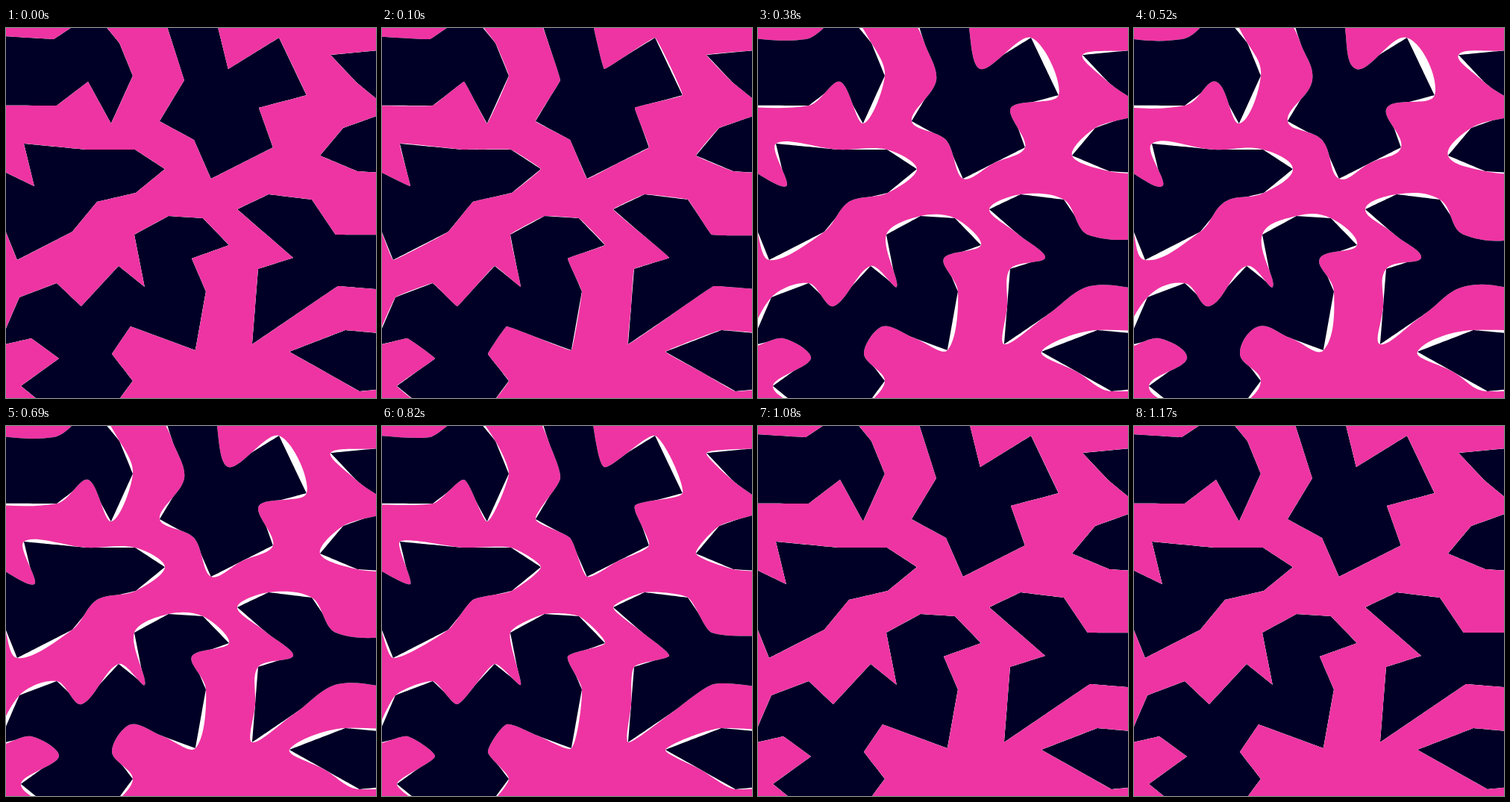
Write an HTML page with a canvas that moves like this. It is 496 by 496 pixels and loops after 1190 ms.

```html
<!DOCTYPE html>
<html lang="en">
<head>
<meta charset="utf-8">
<title>Tension</title>
<style>
  html, body { margin: 0; height: 100%; overflow: hidden; background: #ee34a2; }
  canvas { display: block; }
</style>
</head>
<body>
<canvas width="496" height="496"></canvas>
<script>
const PERIOD = 1190, PEAK = 540, MAX_TENSION = 0.4, LONGEST_EDGE = 92;
const PINK = '#ee34a2', WHITE = '#fff', NAVY = '#000026';
const ctx = document.querySelector('canvas').getContext('2d');

const distance = (a, b) => Math.hypot(b[0] - a[0], b[1] - a[1]);
const midpoint = (a, b) => [(a[0] + b[0]) / 2, (a[1] + b[1]) / 2];

// Key corners of each blob; long edges get a point in the middle.
const blobs = [
  '64,15 118,-21 152,20 170,64 141,128 110,72 68,104 -200,103 -200,-1',
  '205,-36 239,70 206,125 252,150 275,202 358,160 339,107 403,90 366,13 298,55 262,-90',
  '435,36 560,24 600,200 471,192 421,171 452,134 516,111 470,73',
  '24,155 108,163 173,163 213,189 174,221 122,233 89,273 15,311 -6,259 -80,155 38,212',
  '18,361 68,342 101,373 151,319 186,347 172,277 218,252 264,255 299,291 249,309 268,353 254,432 167,400 142,437 170,473 111,553 20,480 71,443 34,416 -10,426',
  '310,243 352,223 410,230 442,277 530,277 600,220 620,360 445,346 330,424 338,323 385,308',
  '380,434 455,405 900,445 474,487'
].map(text => {
  const corners = text.split(' ').map(pair => pair.split(',').map(Number));
  return corners.flatMap((corner, i) => {
    const next = corners[(i + 1) % corners.length];
    return distance(corner, next) > LONGEST_EDGE ? [corner, midpoint(corner, next)] : [corner];
  });
});

// Spline whose handles scale with the adjoining edge; zero tension is straight.
function outline(tension) {
  const path = new Path2D();
  for (const points of blobs) {
    const at = i => points[(i + points.length) % points.length];
    const handle = (i, side) => {
      const here = at(i), to = at(i + side), from = at(i - side);
      const length = distance(here, to);
      const k = tension * length / (length + distance(here, from));
      return here.map((v, axis) => v + k * (to[axis] - from[axis]));
    };
    path.moveTo(...at(0));
    points.forEach((_, i) =>
      path.bezierCurveTo(...handle(i, 1), ...handle(i + 1, -1), ...at(i + 1)));
    path.closePath();
  }
  return path;
}

const polygons = outline(0);

function draw(time) {
  const phase = 2 * Math.PI * (time - PEAK) / PERIOD;
  const curves = outline(MAX_TENSION * (1 + Math.cos(phase)) / 2);
  ctx.fillStyle = PINK;
  ctx.fillRect(0, 0, 496, 496);
  ctx.fillStyle = WHITE;
  ctx.fill(curves);
  ctx.save();
  ctx.clip(curves);
  ctx.fillStyle = NAVY;
  ctx.fill(polygons);
  ctx.restore();
}

const start = performance.now();
function tick() {
  draw((performance.now() - start) % PERIOD);
  requestAnimationFrame(tick);
}
tick();
</script>
</body>
</html>
```
